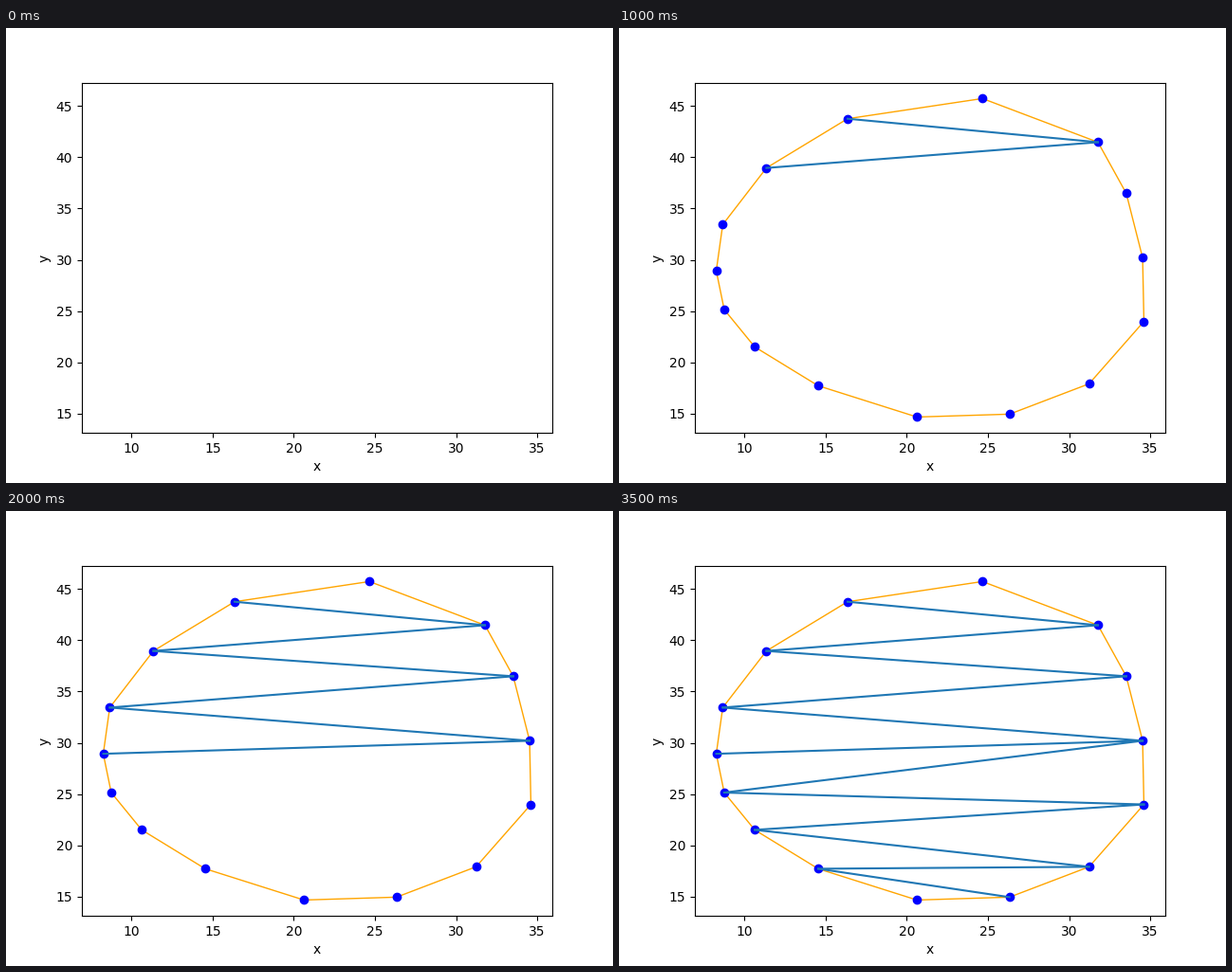
Animation of 640 by 480 pixels, one loop 3.75 s. Source, as a matplotlib script:

```python
import numpy as np
import matplotlib.pyplot as plt
from matplotlib.animation import FuncAnimation

STEP_MS = 250

# Key points of the monotone polygon, each chain listed downwards.
TOP, BOTTOM = (24.66, 45.73), (20.63, 14.67)
RIGHT = [(31.78, 41.47), (33.52, 36.49), (34.53, 30.20),
         (34.61, 23.99), (31.23, 17.91), (26.33, 14.95)]
LEFT = [(16.35, 43.76), (11.35, 38.96), (8.66, 33.44), (8.26, 28.93),
        (8.75, 25.15), (10.63, 21.51), (14.54, 17.72)]


def sweep_diagonals(left, right):
    """Sweep down, joining each corner to the last one on the other side."""
    corners = [(p, 0) for p in left] + [(p, 1) for p in right]
    corners.sort(key=lambda item: -item[0][1])
    last = [None, None]
    pairs = []
    for point, side in corners:
        other = last[1 - side]
        if other:
            pairs.append((other, point))
        last[side] = point
    return pairs


fig, ax = plt.subplots(figsize=(6.4, 4.8), dpi=100)
ax.set_xlabel("x")
ax.set_ylabel("y")


def plot_path(points, *style, **options):
    return ax.plot(*np.transpose(points), *style, **options)[0]


corners = [TOP, *RIGHT, BOTTOM, *LEFT[::-1]]
parts = [plot_path(corners + [TOP], color="orange", linewidth=1),
         plot_path(corners, "bo", markersize=6)]
parts += [plot_path(pair, color="C0", linewidth=1.5)
          for pair in sweep_diagonals(LEFT, RIGHT)]


def draw(step):
    """Show one more part on each step, starting from empty axes."""
    for i, part in enumerate(parts):
        part.set_visible(i < step)
    return parts


anim = FuncAnimation(fig, draw, frames=len(parts) + 1, interval=STEP_MS,
                     init_func=lambda: draw(0), repeat=True, repeat_delay=0)
plt.show()
```
